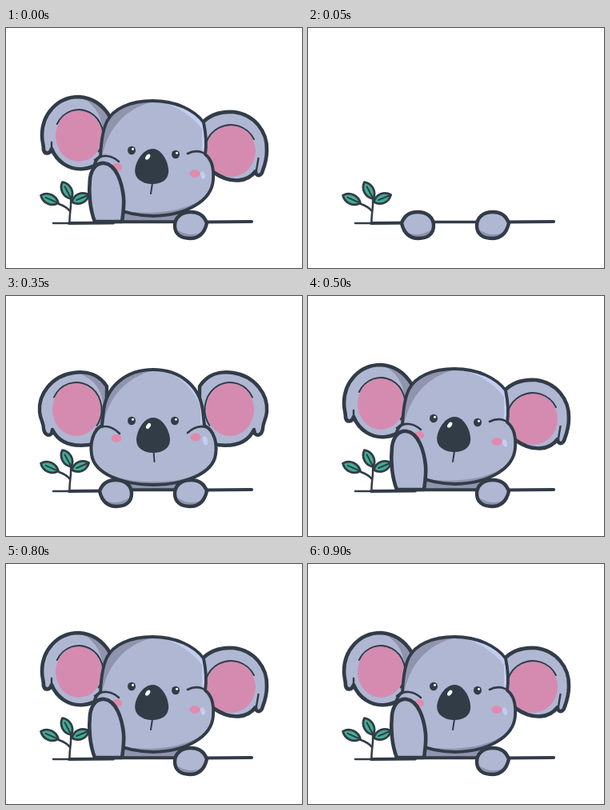
An HTML page with a canvas that plays this animation: 370 px wide and 300 px high, repeating every 1000 ms.

```html
<!DOCTYPE html>
<html lang="en">
<head>
<meta charset="utf-8">
<title>Peeking koala</title>
<style>
html, body { margin: 0; width: 100%; height: 100%; overflow: hidden; background: #fff; }
canvas { display: block; width: 370px; height: 300px; }
</style>
</head>
<body>
<canvas id="stage" width="370" height="300"></canvas>
<script>
const ctx = document.getElementById('stage').getContext('2d');
const INK = '#323c47', FUR = '#b0b7d3', SHADE = '#9094ad', LIGHT = '#c3cdf0';
const PINK = '#d58bb0', BLUSH = '#e08bae', GREEN = '#43ae94';
const LOOP = 1000;

ctx.lineCap = ctx.lineJoin = 'round';

function line(d, width, color = INK) {
  ctx.strokeStyle = color;
  ctx.lineWidth = width;
  ctx.stroke(new Path2D(d));
}

function fill(d, color) {
  ctx.fillStyle = color;
  ctx.fill(new Path2D(d));
}

// Fill a shape, paint details clipped inside it, then outline it.
function shape(d, color, width, inside) {
  fill(d, color);
  if (inside) {
    ctx.save();
    ctx.clip(new Path2D(d));
    inside();
    ctx.restore();
  }
  line(d, width);
}

function oval(x, y, rx, ry, color, turn = 0) {
  ctx.fillStyle = color;
  ctx.beginPath();
  ctx.ellipse(x, y, rx, ry, turn, 0, Math.PI * 2);
  ctx.fill();
}

function at(x, y, turn, draw) {
  ctx.save();
  ctx.translate(x, y);
  ctx.rotate(turn);
  draw();
  ctx.restore();
}

function mirrored(axis, draw) {
  ctx.save();
  ctx.translate(axis * 2, 0);
  ctx.scale(-1, 1);
  draw();
  ctx.restore();
}

// Pink of a left ear with the crease above it; mirror it for the right ear.
function innerEar(x, y, rx, ry) {
  oval(x, y, rx, ry, PINK);
  ctx.strokeStyle = INK;
  ctx.lineWidth = 2;
  ctx.beginPath();
  ctx.ellipse(x, y, rx + 1.5, ry + 1, 0, Math.PI * 1.15, Math.PI * 2.2);
  ctx.stroke();
}

function leaf(x, y, turn, s) {
  at(x, y, turn, () => {
    shape(`M${-s} 0C${-s * .5} -8 ${s * .5} -8 ${s} 0C${s * .5} 8 ${-s * .5} 8 ${-s} 0Z`, GREEN, 2.8);
    line(`M${-s * .45} 0L${s} 0`, 2);
  });
}

function plant() {
  line('M79.5 243C79 233 82 224 81 212M80 229C77 225 72 222 66 220', 2.5);
  leaf(54.5, 214, .42, 12);
  leaf(76, 203, 1.08, 11.8);
  leaf(93, 213, -.4, 11.5);
}

function ledge() {
  line('M59 244L80 244', 2.4);
  line('M79 244L134 243.5', 4);
  line('M134 242.5L212 242.5', 3.6);
  line('M250 242.5L307 242', 4.2);
}

function paw() {
  shape('M117 244C120 235 127 230 137 230C149 230 157 237 157 247C157 258 149 263 138 263C127 263 120 257 117 244Z',
    FUR, 4.4, () => fill('M114 248C125 261 145 262 160 247L160 268L114 268Z', SHADE));
}

const rightPaw = () => mirrored(184, paw);

function nose(x, y, turn) {
  at(x, y, turn, () => {
    fill('M0 -22C12 -22 21 -5 21 6C21 16 12 22 0 22C-12 22 -21 16 -21 6C-21 -5 -12 -22 0 -22Z', INK);
    oval(-6, -11.5, 2.4, 4, '#fff', .6);
  });
}

function eye(x, y) {
  oval(x, y, 5, 5.2, INK);
  oval(x + 1.5, y - 1.8, 1.5, 1.5, '#fff');
}

const EAR_LOW = 'M126 111C113 100 98 98 85 102C62 108 49 126 50 145C51 158 56 162 58 170C61 181 67 187 72 186C75 185 72 181 73 178C81 188 94 192 113 190L126 150Z';
const EAR_WIDE = 'M126 113C117 99 102 93 84 96C57 100 40 123 42 145C43 155 47 158 47 166C48 173 53 176 57 172L58 167C66 184 84 190 111 185L126 150Z';

function frontEar(wide, shaded) {
  shape(wide ? EAR_WIDE : EAR_LOW, FUR, 4.4, () => {
    if (shaded) fill(`M${wide ? 86 : 90} 94C106 102 118 112 121 132L111 192L140 192L130 90Z`, SHADE);
    if (wide) innerEar(88, 142, 30, 33);
    else innerEar(95, 148, 28, 31);
  });
}

const HEAD = 'M184 88C151 88 126 108 122 139L120 158C108 164 105 181 107 194C110 218 145 232 184 232C223 232 259 218 262 194C264 181 261 164 248 158L246 139C242 108 217 88 184 88Z';

function frontPose(wide) {
  plant();
  ledge();
  shape('M139 222L229 222L222 242L147 242Z', SHADE, 3.5);
  frontEar(wide, true);
  mirrored(184, () => frontEar(wide, false));
  at(0, wide ? 4 : 0, 0, () => {
    shape(HEAD, FUR, 4, () => {
      fill('M120 164C126 126 146 98 190 87L108 78Z', SHADE);
      fill('M188 87C212 92 232 107 243 134L243 156L250 156L250 90L200 78Z', LIGHT);
      fill('M104 193C116 223 156 229 188 228C222 228 250 220 264 192L268 238L100 238Z', SHADE);
      oval(249, 177, 3, 6, LIGHT, -.25);
    });
    line('M113 162C124 156 134 160 142 168M255 162C244 156 235 160 227 167', 2.6);
    oval(138, 174, 6.5, 5, BLUSH);
    oval(237, 172.5, 6.5, 5, BLUSH);
    eye(157, 152);
    eye(211, 152);
    nose(184, 170, 0);
    line('M184.5 190L185.5 203', 2);
  });
  paw();
  rightPaw();
  if (!wide) line('M97 161Q94 183 92 207M119 194L118 226M275 144Q278 185 277 231', 1.5);
}

function leaningPose() {
  plant();
  ledge();
  shape('M140 220L222 220L215 242L142 242Z', SHADE, 3.5);

  // Ears with the fold at their tips
  shape('M130 111C121 96 108 87 91 86C64 86 45 108 45 134C45 143 47 145 47 152C48 158 55 158 57 151C64 168 80 178 97 176C106 175 112 172 118 168L131 140Z',
    FUR, 4.6, () => {
      fill('M88 85C106 90 119 105 121 128L115 180L140 170L136 84Z', SHADE);
      innerEar(91, 135, 29, 32);
    });
  line('M57 152L57 143', 2.4);
  shape('M245 119C255 108 269 104 285 105C310 108 327 129 326 153C326 163 324 170 321 178C319 186 312 186 312 179C303 191 283 197 259 180L243 150Z',
    FUR, 4.6, () => mirrored(184, () => innerEar(87, 154, 31, 32)));
  line('M312.5 181L315.5 163', 2.4);

  shape('M183 91C155 91 134 101 126 117C120 130 119 146 118 160C110 166 107 178 109 195C115 222 148 234 184 235C226 234 257 216 259 190C260 176 257 164 249 158C251 145 250 132 247 118C236 103 213 91 183 91Z',
    FUR, 3.8, () => {
      fill('M119 165C127 125 148 100 190 90L110 80Z', SHADE);
      fill('M186 90C210 96 230 107 245 126L245 156L256 156L255 112L200 80Z', LIGHT);
      fill('M140 228C180 234 226 231 251 209L262 240L140 240Z', SHADE);
      oval(246, 184, 2.8, 4.8, LIGHT, -.3);
    });
  line('M111 165C121 157 132 159 141 167M250 158C243 153 234 153 227 157', 2.6);
  oval(139, 174, 6, 5, BLUSH);
  oval(236, 182, 6.5, 5, BLUSH);
  eye(157, 153);
  eye(212, 158);
  nose(182.5, 173, .06);
  line('M183 194L181 207', 2);

  // Arm propping up the cheek
  shape('M111 242C105 227 103 206 105 188C107 175 114 168 123 169C138 171 145 193 147 212C148 224 146 234 145 242Z', FUR, 4.6);
  rightPaw();
}

function hiddenPose() {
  plant();
  ledge();
  paw();
  rightPaw();
}

function draw(t) {
  ctx.fillStyle = '#fff';
  ctx.fillRect(0, 0, 370, 300);
  if (t < 50 || t >= 500) leaningPose();
  else if (t < 200) hiddenPose();
  else frontPose(t >= 350);
}

const start = performance.now();
function tick() {
  draw((performance.now() - start) % LOOP);
  requestAnimationFrame(tick);
}
tick();
</script>
</body>
</html>
```
